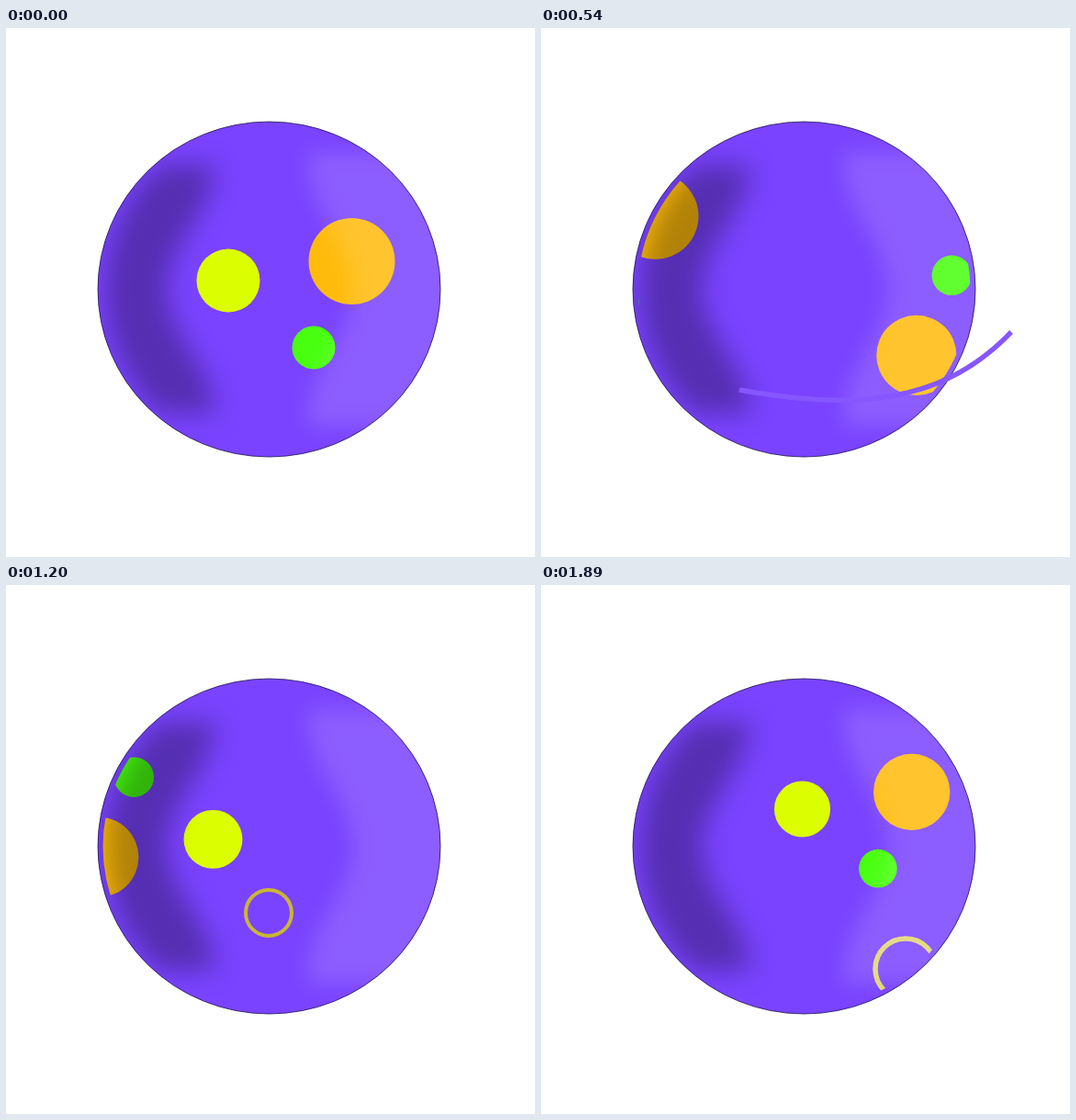
These frames come from a looping animation (576 by 576 pixels, 1920 ms). An HTML page with a canvas:

```html
<!DOCTYPE html>
<html lang="en">
<head>
<meta charset="utf-8">
<title>Spinning planet</title>
<style>
html, body { margin: 0; width: 100%; height: 100%; overflow: hidden; background: #fff; }
canvas { display: block; width: 576px; height: 576px; }
</style>
</head>
<body>
<canvas id="stage" width="576" height="576"></canvas>
<script>
const LOOP = 1920, STEP = 30;
const CX = 286.5, CY = 284.5, RX = 186.5, RY = 182.5;
const VX = -7 / 15, VY = -0.091; // surface drift, px per ms
const ctx = document.getElementById('stage').getContext('2d');

// One trio of spots, relative to the yellow one
const trio = [
  { dx: 0, dy: 0, r: 34.5, color: '#dcff00' },
  { dx: 134.5, dy: -21, r: 47, color: '#ffbb0c' },
  { dx: 93, dy: 73, r: 23.5, color: '#48ff0f' }
];

// Each pass of the trio is smaller; a negative scale turns it half round
const passes = [
  { t: 0, x: 242, y: 275, scale: 1 },
  { t: 990, x: 323.5, y: 296, scale: -0.927 },
  { t: 1890, x: 284.5, y: 244, scale: 0.886 }
];

const rings = [
  { t: 990, x: 331, y: 155, r: 24, inner: 16.5, born: 720, width: 3.5, color: '#7cd2ff' },
  { t: 990, x: 384, y: 376, r: 25, inner: 15.5, born: 840, width: 4, color: '#c9b636' },
  { t: 1890, x: 397, y: 418, r: 33, inner: 0, born: 1740, width: 5.5, color: '#e2d672' }
];

// Cubic curves, each fully drawn at its "peak" time
const trails = [
  { layer: 'back', color: '#7341ec', peak: 210, curve: [195, 465, 232, 547, 306, 553, 365, 450] },
  { layer: 'front', color: '#6a35dc', peak: 210, curve: [269, 417, 375, 393, 478, 325, 502, 233] },
  { layer: 'lit', color: '#26f51c', peak: 210, curve: [193, 310, 191, 360, 182, 392, 174, 412] },
  { layer: 'lit', color: '#0fe4ee', peak: 210, curve: [296, 280, 302, 297, 311, 311, 322, 321] },
  { layer: 'front', color: '#8656ff', peak: 540, curve: [216, 394, 330, 414, 432, 415, 512, 331] },
  { layer: 'lit', color: '#0a92d2', peak: 750, curve: [238, 62, 162, 120, 162, 250, 181, 352] },
  { layer: 'back', color: '#0a92d2', peak: 990, curve: [287, 517, 331, 541, 364, 528, 377, 469] },
  { layer: 'lit', color: '#06d0c2', peak: 990, curve: [91, 284, 160, 362, 254, 412, 358, 425] }
];
const TRAIL_TIME = 150; // from first sight to peak, and from peak to gone

const clamp = (v, lo, hi) => Math.max(lo, Math.min(hi, v));

function ellipse(g, rx, ry) {
  g.beginPath();
  g.ellipse(CX, CY, rx, ry, 0, 0, 2 * Math.PI);
}

// Fills a soft band between two edges x(v), v being the height from -1 to 1
function softBand(g, color, blur, reach, inner, outer) {
  g.filter = `blur(${blur}px)`;
  g.fillStyle = color;
  g.beginPath();
  for (const [edge, side] of [[inner, 1], [outer, -1]]) {
    for (let k = -20; k <= 20; k++) {
      const v = side * reach * k / 20;
      g.lineTo(edge(v), CY + RY * v);
    }
  }
  g.fill();
}

function makeShade() {
  const layer = document.createElement('canvas');
  layer.width = layer.height = 576;
  const g = layer.getContext('2d');
  ellipse(g, RX, RY);
  g.clip();
  softBand(g, 'rgba(0,0,0,.3)', 14, 0.74,
    v => 201 - 26 * Math.cos(Math.PI * v / 0.74),
    v => CX - 178 * Math.sqrt(1 - v * v));
  softBand(g, 'rgba(255,255,255,.14)', 11, 0.82,
    v => 353 + 24 * Math.cos(Math.PI * v / 0.75),
    () => 520);
  return layer;
}
const shade = makeShade();

function drawTrails(t, layer) {
  ctx.lineWidth = 5.5;
  for (const trail of trails) {
    const k = (t - trail.peak) / TRAIL_TIME;
    if (trail.layer !== layer || Math.abs(k) >= 1) continue;
    const tail = clamp(k + k * k / 2, -0.12, 1.12);
    const head = clamp(1 + k - k * k / 2, -0.12, 1.12);
    const [x0, y0, x1, y1, x2, y2, x3, y3] = trail.curve;
    const cubic = (u, a, b, c, d) => {
      const w = 1 - u;
      return w * w * w * a + 3 * w * w * u * b + 3 * w * u * u * c + u * u * u * d;
    };
    ctx.strokeStyle = trail.color;
    ctx.beginPath();
    for (let i = 0; i <= 40; i++) {
      const u = tail + (head - tail) * i / 40;
      ctx.lineTo(cubic(u, x0, x1, x2, x3), cubic(u, y0, y1, y2, y3));
    }
    ctx.stroke();
  }
}

function circle(x, y, r) {
  ctx.beginPath();
  ctx.arc(x, y, r, 0, 2 * Math.PI);
}

const drift = (o, t) => [o.x + VX * (t - o.t), o.y + VY * (t - o.t)];

function drawSpots(t) {
  for (const pass of passes) {
    const [x, y] = drift(pass, t);
    for (const { dx, dy, r, color } of trio) {
      ctx.fillStyle = color;
      circle(x + dx * pass.scale, y + dy * pass.scale, r * Math.abs(pass.scale));
      ctx.fill();
    }
  }
}

// The inner circle fades before the outer one
function drawRings(t) {
  for (const ring of rings) {
    const age = t - ring.born;
    if (age < 0) continue;
    const [x, y] = drift(ring, t);
    ctx.strokeStyle = ring.color;
    ctx.lineWidth = ring.width;
    for (const [r, end] of [[ring.r, 450], [ring.inner, 260]]) {
      if (!r) continue;
      ctx.globalAlpha = clamp((end - age) / 90, 0, 1);
      circle(x, y, r);
      ctx.stroke();
    }
  }
}

function draw(t) {
  ctx.fillStyle = '#fff';
  ctx.fillRect(0, 0, 576, 576);
  drawTrails(t, 'back');
  ellipse(ctx, RX, RY);
  ctx.fillStyle = '#7a43ff';
  ctx.fill();

  ctx.save();
  ellipse(ctx, 181, 177);
  ctx.clip();
  drawSpots(t);
  drawRings(t);
  ctx.restore();

  drawTrails(t, 'lit');
  ctx.drawImage(shade, 0, 0);
  ellipse(ctx, RX, RY);
  ctx.strokeStyle = '#1d1450';
  ctx.lineWidth = 0.8;
  ctx.stroke();
  drawTrails(t, 'front');
}

const start = performance.now();
function frame() {
  const t = (performance.now() - start) % LOOP;
  draw(Math.floor(t / STEP) * STEP);
  requestAnimationFrame(frame);
}
frame();
</script>
</body>
</html>
```
